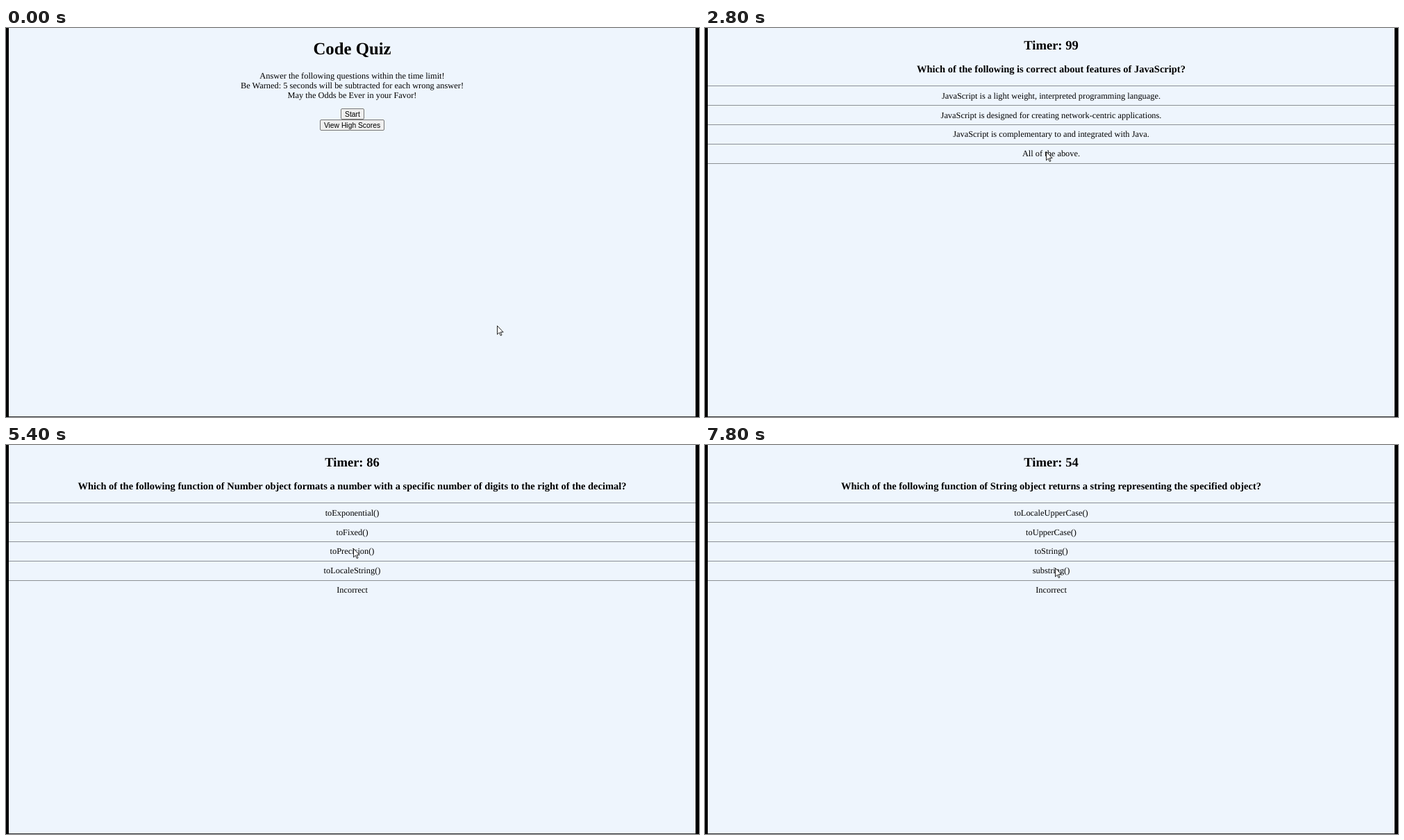
Animation of 998 by 561 pixels, one loop 8000 ms. Source, as an HTML page:

```html
<!DOCTYPE html>
<html lang="en">
<head>
<meta charset="utf-8">
<title>Code Quiz</title>
<style>
  * { box-sizing: border-box; margin: 0; padding: 0; }
  html, body { width: 100%; height: 100%; overflow: hidden; background: #000; }

  .stage {
    position: relative; width: 998px; height: 561px; overflow: hidden;
    background: #eef5fd; color: #000; text-align: center;
    border: solid #000; border-width: 0 5px 0 4px;
    font: 12.38px/14px "Liberation Serif", "Times New Roman", serif;
    text-rendering: geometricPrecision;
  }
  .stage::after {
    content: ""; position: absolute; left: 0; bottom: 0;
    width: 100%; height: 1px; background: #3c3e40;
  }

  /* Pages and timer values are stacked; each strip jumps by whole steps. */
  .pages, .timer div, .cursor { animation: 8s step-end infinite; }
  .pages { animation-name: pages; }
  .page { position: relative; height: 561px; }

  h1 { padding-top: 17px; font-size: 24.77px; line-height: 27px; }
  .intro p { margin-top: 18px; }
  .intro button {
    display: block; position: absolute; height: 16px;
    border: 1px solid #767676; border-radius: 2px; background: #efefef; color: #000;
    font: 10.32px/13px "Liberation Sans", Arial, sans-serif;
  }
  .start { left: 478px; top: 116px; width: 34px; animation: hover 8s step-end infinite; }
  .scores { left: 448px; top: 132px; width: 93px; }

  .timer { position: absolute; left: 0; top: 15px; width: 100%; height: 21px; overflow: hidden; }
  .timer div { animation-name: ticks; }
  .timer h2 { height: 21px; font-size: 18.58px; line-height: 21px; }

  h3 { padding-top: 52px; font-size: 14.49px; line-height: 16.5px; }
  ul { margin-top: 14.7px; list-style: none; }
  li { height: 27.86px; padding-top: 6.5px; border-top: 1px solid #8b9094; }

  .cursor { position: absolute; left: -4px; top: 0; width: 10px; height: 16px; overflow: visible; animation-name: move; }

  @keyframes pages {
    0% { transform: translateY(0); }
    17.5% { transform: translateY(-561px); }
    40% { transform: translateY(-1122px); }
    60% { transform: translateY(-1683px); }
    72.5% { transform: translateY(-2244px); }
    82.5% { transform: translateY(-2805px); }
    90%, 100% { transform: translateY(-3366px); }
  }
  @keyframes ticks {
    0% { transform: translateY(0); }
    17.5% { transform: translateY(-21px); }
    30% { transform: translateY(-42px); }
    42.5% { transform: translateY(-63px); }
    55% { transform: translateY(-84px); }
    67.5% { transform: translateY(-105px); }
    80% { transform: translateY(-126px); }
    92.5%, 100% { transform: translateY(-147px); }
  }
  @keyframes hover {
    0%, 100% { background: #efefef; }
    15% { background: #e5e5e5; }
  }
  @keyframes move {
    0% { transform: translate(707px, 429px); }
    2.5% { transform: translate(748px, 398px); }
    5% { transform: translate(777px, 334px); }
    7.5% { transform: translate(738px, 242px); }
    10% { transform: translate(636px, 172px); }
    12.5% { transform: translate(536px, 134px); }
    15% { transform: translate(497px, 122px); }
    20% { transform: translate(494px, 121px); }
    30% { transform: translate(494px, 134px); }
    32.5% { transform: translate(492px, 162px); }
    35% { transform: translate(491px, 178px); }
    47.5% { transform: translate(488px, 173px); }
    50% { transform: translate(476px, 159px); }
    52.5% { transform: translate(462px, 142px); }
    55% { transform: translate(453px, 129px); }
    57.5% { transform: translate(450px, 124px); }
    62.5% { transform: translate(464px, 134px); }
    65% { transform: translate(488px, 145px); }
    67.5% { transform: translate(500px, 149px); }
    75% { transform: translate(503px, 132px); }
    77.5% { transform: translate(506px, 106px); }
    80% { transform: translate(506px, 93px); }
    85% { transform: translate(507px, 106px); }
    87.5% { transform: translate(507px, 116px); }
    92.5% { transform: translate(506px, 140px); }
    95% { transform: translate(505px, 165px); }
    97.5%, 100% { transform: translate(504px, 177px); }
  }
</style>
</head>
<body>
<main class="stage">
  <div class="pages">
    <section class="page intro">
      <h1>Code Quiz</h1>
      <p>Answer the following questions within the time limit!<br>
        Be Warned: 5 seconds will be subtracted for each wrong answer!<br>
        May the Odds be Ever in your Favor!</p>
      <button class="start">Start</button>
      <button class="scores">View High Scores</button>
    </section>
    <section class="page">
      <h3>Which of the following is correct about features of JavaScript?</h3>
      <ul>
        <li>JavaScript is a light weight, interpreted programming language.</li>
        <li>JavaScript is designed for creating network-centric applications.</li>
        <li>JavaScript is complementary to and integrated with Java.</li>
        <li>All of the above.</li>
        <li></li>
      </ul>
    </section>
    <section class="page">
      <h3>Which of the following is correct about callbacks?</h3>
      <ul>
        <li>A callback is a plain JavaScript function passed to some method as an argument or option.</li>
        <li>Some callbacks are just events, called to give the user a chance to react when a certain state is triggered.</li>
        <li>Both of the above.</li>
        <li>None of the above.</li>
        <li>Correct</li>
      </ul>
    </section>
    <section class="page">
      <h3>Which of the following function of Number object formats a number with a specific number of digits to the right of the decimal?</h3>
      <ul>
        <li>toExponential()</li>
        <li>toFixed()</li>
        <li>toPrecision()</li>
        <li>toLocaleString()</li>
        <li>Incorrect</li>
      </ul>
    </section>
    <section class="page">
      <h3>Which of the following function of String object returns a number indicating the Unicode value of the character at the given index?</h3>
      <ul>
        <li>charAt()</li>
        <li>charCodeAt()</li>
        <li>concat()</li>
        <li>indexOf()</li>
        <li>Incorrect</li>
      </ul>
    </section>
    <section class="page">
      <h3>Which of the following function of String object is used to find a match between a regular expression and a string, and to replace the matched substring with a new substring?</h3>
      <ul>
        <li>concat()</li>
        <li>match()</li>
        <li>replace()</li>
        <li>search()</li>
        <li>Incorrect</li>
      </ul>
    </section>
    <section class="page">
      <h3>Which of the following function of String object returns a string representing the specified object?</h3>
      <ul>
        <li>toLocaleUpperCase()</li>
        <li>toUpperCase()</li>
        <li>toString()</li>
        <li>substring()</li>
        <li>Incorrect</li>
      </ul>
    </section>
  </div>
  <div class="timer">
    <div>
      <h2></h2>
      <h2>timer:</h2>
      <h2>Timer: 99</h2>
      <h2>Timer: 98</h2>
      <h2>Timer: 97</h2>
      <h2>Timer: 86</h2>
      <h2>Timer: 75</h2>
      <h2>Timer: 54</h2>
    </div>
  </div>
  <svg class="cursor" viewBox="0 0 10 16">
    <path d="M.5.5V12.9L3.4 10.2 5.3 14.6 7 13.8 5.2 9.6H9.1Z" fill="#fff" stroke="#000" stroke-width=".85"/>
  </svg>
</main>
</body>
</html>
```
